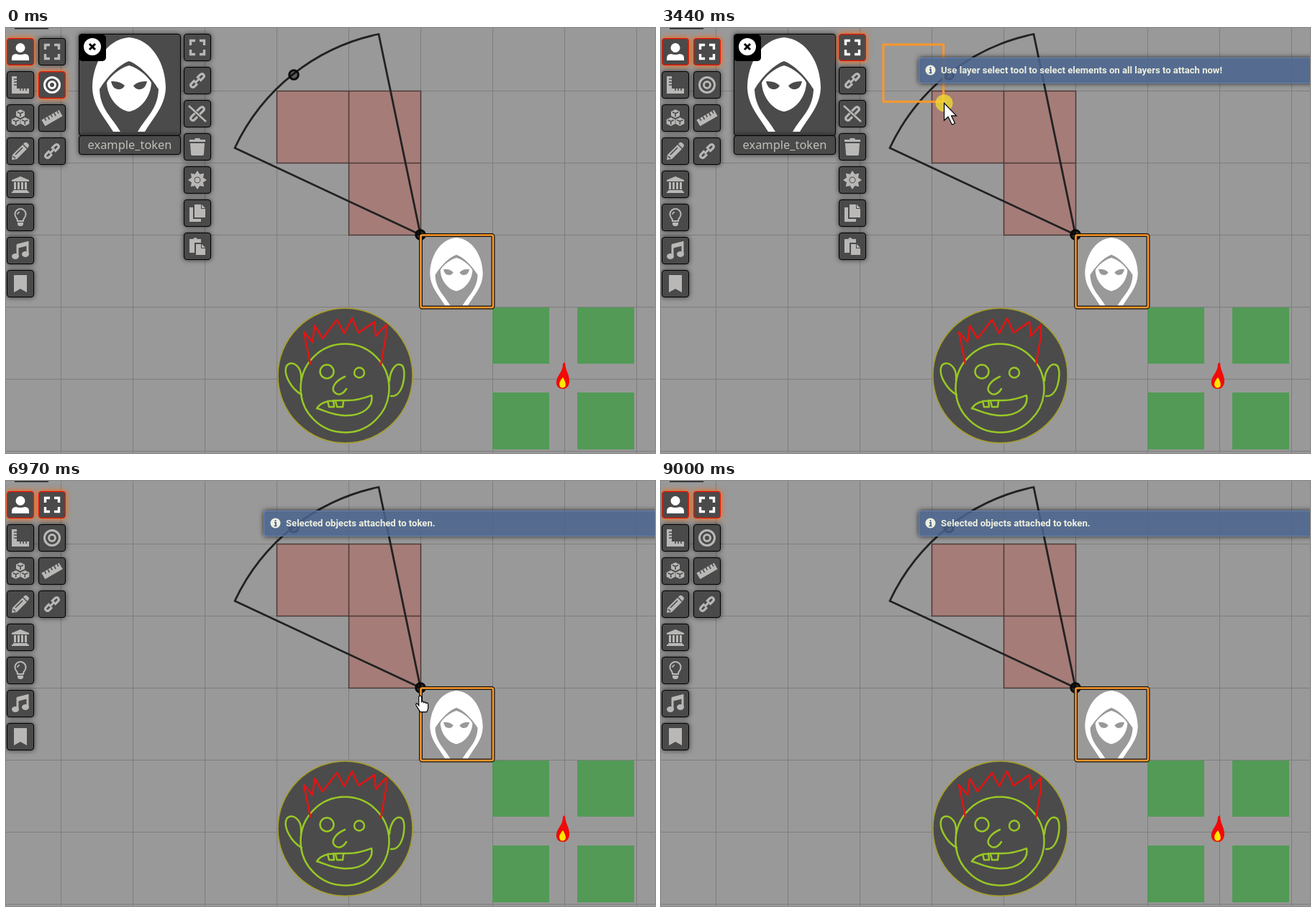
Recreate the animation shown at these times as an HTML page. Size 902 by 590 pixels, loop 9.32 s.

```html
<!DOCTYPE html>
<html lang="en">
<head>
<meta charset="utf-8">
<title>Attach elements to a token</title>
<style>
html, body { margin: 0; width: 100%; height: 100%; overflow: hidden; background: #999; }
#stage { position: relative; width: 902px; height: 590px; overflow: hidden; }
#stage > * { position: absolute; box-sizing: border-box; }
#scene, #pointer { left: 0; top: 0; }
#scene path, #scene circle { stroke-linejoin: round; stroke-linecap: round; }
.button { width: 38px; height: 38px; border: 1px solid #000; border-radius: 4px;
  background: #4a4a4a; box-shadow: 0 0 7px #000a; color: #b9b8b6; }
.button.on { border-color: #f21400; box-shadow: 0 0 9px #ff6400, inset 0 0 2px #f21400; color: #fff; }
.button svg { position: absolute; left: 6px; top: 6px; fill: currentColor; overflow: visible; }
.button .line { fill: none; stroke: currentColor; stroke-width: 3; }
.button .cut { fill: none; stroke: #4a4a4a; stroke-width: 1.6; }
#card { left: 101px; top: 8px; width: 142px; height: 168px; }
#card > * { position: absolute; box-sizing: border-box; left: 0; }
#card .face { width: 142px; height: 142px; border: 1px solid #000; border-radius: 4px;
  background: #4b4b4b; box-shadow: 0 0 7px #000a; }
#card .name { top: 141px; width: 142px; height: 27px; border: 1px solid #000; border-radius: 4px;
  background: #4a4a4a; box-shadow: 0 0 7px #000a; color: #c1bfb8; text-align: center;
  font: 16.4px/24px "Noto Sans", sans-serif; }
.toast { left: 358px; width: 560px; height: 36px; border: 1px solid #6583b1; border-radius: 4px;
  background: rgba(74, 101, 142, .86); box-shadow: 0 0 7px #000b; color: #f0f0e0;
  font: bold 13.1px/34px Roboto, sans-serif; padding-left: 30px; white-space: nowrap; }
.toast svg { position: absolute; left: 8px; top: 9px; }
</style>
</head>
<body>
<div id="stage">
  <svg id="scene" width="902" height="590" fill="none">
    <defs>
      <pattern id="grid" x="76" y="87" width="100" height="100" patternUnits="userSpaceOnUse">
        <path d="M.5 0V100M0 .5H100" stroke="#7d7d7d"/>
      </pattern>
      <path id="hood" fill-rule="evenodd" d="M0 0C-33 3-51 38-51 70C-50 95-36 108-22 131H-12C-24 110-40 100-41 72C-30 54-14 38 0 33C14 38 30 54 41 72C40 100 24 110 12 131H22C36 108 50 95 51 70C51 38 33 3 0 0Z
        M0 39C-14 43-27 55-31 63C-30 85-14 101 0 103C14 101 30 85 31 63C27 55 14 43 0 39Z
        M-25 61Q-13 60-6 67Q-9 73-16 72Q-23 71-25 61Z M25 61Q13 60 6 67Q9 73 16 72Q23 71 25 61Z"/>
      <g id="token">
        <use href="#hood" fill="#fff" transform="translate(626 291) scale(.72)"/>
        <rect x="576.5" y="287.5" width="100.5" height="100.5" rx="2" stroke="#111" stroke-width="5"/>
        <rect x="576.5" y="287.5" width="100.5" height="100.5" rx="2" stroke="#ff9829" stroke-width="2.6"/>
      </g>
    </defs>
    <rect width="902" height="590" fill="#999"/>
    <rect width="902" height="590" fill="url(#grid)"/>
    <g id="attached">
      <path d="M376.5 87.5h100v100h-100zM476.5 87.5h100v100h-100zM476.5 187.5h100v100h-100z"
        fill="#b0655e" fill-opacity=".55" stroke="#3a2a28" stroke-opacity=".8" stroke-width="1.5"/>
      <path d="M576 287L318 166.5A285 285 0 0 1 518 8.5Z" stroke="#222" stroke-width="2.8"/>
      <circle cx="400" cy="65" r="6.3" fill="#0006" stroke="#0a0a0a" stroke-width="3"/>
      <circle cx="576" cy="287" r="6.3" fill="#000a" stroke="#0a0a0a" stroke-width="3"/>
      <circle cx="471.5" cy="482.5" r="93.5" fill="#4b4b4b" stroke="#a59d28" stroke-width="1.5"/>
      <g stroke="#98c825" stroke-width="2.5">
        <circle cx="471" cy="500" r="61.5"/><circle cx="446" cy="477" r="9.5"/><circle cx="491" cy="478.5" r="7"/>
        <path d="M411 509C396 501 385 480 390 469C397 460 412 469 410 489M533 490C534 474 543 462 551 469C557 478 552 513 535 511
          M471 484C457 490 452 500 456 505C461 511 468 509 473 501
          M432 528C441 515 459 517 475 517C490 517 500 513 508 510C511 524 498 539 470 538C452 537 443 531 432 528Z
          M447 518L449 526H456L455 517M458 518L460 526H468L469 518"/>
      </g>
      <path stroke="#e21414" stroke-width="2.5" d="M423 466L414 422L426 436L429 413L440 431L460 405L470 424L481 403L490 423L512 408L514 428L528 412V428L521 467"/>
      <path fill="#529a56" d="M676 388h79v78h-79zM794 388h79v78h-79zM676 506h79v79h-79zM794 506h79v79h-79z"/>
      <path fill="#f00a08" d="M777 464C777 475 783 480 783 490C783 498 778 501 774 501C767 501 764 496 765 490C766 482 774 478 774 466Z"/>
      <path fill="#ffe600" d="M774 485C777 490 779 495 777 498Q773 501 770 498Q767 492 774 485Z"/>
    </g>
    <use id="placed" href="#token"/>
    <use id="dragged" href="#token" opacity=".8"/>
    <rect id="marquee" x="309" y="23" stroke="#ff9829" stroke-width="3"/>
    <rect x="12" width="47" height="1.5" fill="#222"/>
  </svg>
  <div id="card">
    <div class="face"></div>
    <svg width="142" height="142"><use href="#hood" fill="#fff" x="70" y="5"/>
      <rect y="1" width="38" height="37" rx="5"/><circle cx="19" cy="18" r="12" fill="#fff"/>
      <path d="M15 14l8 8m0-8l-8 8" stroke="#000" stroke-width="3"/></svg>
    <div class="name">example_token</div>
  </div>
  <svg id="pointer" width="902" height="590" style="z-index:2">
    <g id="cursor">
      <circle id="press" r="12" fill="#f4e32c" opacity=".72"/>
      <g fill="#fff" stroke="#000" stroke-width="1.2">
        <path id="arrow" d="M0 0V24L5.5 19L11 30L15 28L10 17.5H17Z"/>
        <path id="hand" d="M-2 1Q0-2 2 1V8Q4 6 5 9Q7 7 8 10Q10 8 11 11V16Q11 18 9 22H0Q-2 19-5 14Q-7 11-5 10Q-4 10-2 13Z"/>
      </g>
    </g>
  </svg>
</div>
<script>
const $ = id => document.getElementById(id);
const stage = $('stage');
const line = (d, w = 3) => `<path class="line" style="stroke-width:${w}" d="${d}"/>`;
const cut = d => `<path class="cut" d="${d}"/>`;
const fill = d => `<path d="${d}"/>`;
const turn = (angle, body) => `<g transform="rotate(${angle} 12 12)">${body}</g>`;
const cube = (x, y) => `<g transform="translate(${x} ${y})">` +
  fill('M0-6L6-3V3L0 6L-6 3V-3Z') + cut('M-4-2.3L0-.3L4-2.3M0 0V4') + '</g>';
const chain = line('M10 9H4Q0 9 0 12T4 15H9M14 9H20Q24 9 24 12T20 15H14', 3.2);

const icons = {
  user: '<circle cx="12" cy="6.5" r="6.5"/>' + fill('M0 24V21Q0 15 6 15Q12 17 18 15Q24 15 24 21V24Z'),
  expand: line('M2.5 9V2.5H9M15 2.5H21.5V9M21.5 15V21.5H15M9 21.5H2.5V15', 3.4),
  target: '<circle class="line" cx="12" cy="12" r="10.5"/><circle class="line" cx="12" cy="12" r="4.5"/>',
  square: fill('M0 0H7V17H24V24H0Z') + cut('M3 4H7M3 8H7M3 12H7M12 17V20M16 17V20M20 17V20'),
  cubes: cube(12, 6) + cube(5.7, 17) + cube(18.3, 17),
  ruler: turn(-30, fill('M-2 7H26V17H-2Z') + cut('M3 7V11M8 7V12M13 7V11M18 7V12M23 7V11')),
  pencil: fill('M0 24L1 17L15 3L21 9L7 23ZM16 2L18 0Q20-1 22 1L23 2Q25 4 23 6L22 8Z') + cut('M5 17L15 7M2 19L5 22'),
  link: turn(-45, chain + line('M7 12H17')),
  temple: fill('M12 1L24 6V8H0V6ZM2 20H22V22H24V24H0V22H2ZM3 9H6V19H3ZM8 9H11V19H8ZM13 9H16V19H13ZM18 9H21V19H18Z'),
  bulb: line('M8 17Q8 14 6 12A7.5 7.5 0 1 1 18 12Q16 14 16 17Z', 2) + fill('M8 19H16V22L14 24H10L8 22Z') + line('M8 8Q8 5 11 4.5', 1.5),
  music: line('M8 20V5L22 1V17', 3) + fill('M7 3L23-1V5L7 9Z') + '<ellipse cx="5" cy="20" rx="5" ry="4"/><ellipse cx="19" cy="17" rx="5" ry="4"/>',
  bookmark: fill('M3 0H21V24L12 19L3 24Z'),
  unlink: turn(-45, chain) + line('M0 1L24 23', 2.6),
  trash: fill('M1 2H8L9 0H15L16 2H23V5H1ZM2 7H22L21 22Q21 24 19 24H5Q3 24 3 22Z'),
  sun: [0, 45, 90, 135].map(a => turn(a, fill('M8 5L12-1L16 5ZM8 19L12 25L16 19Z'))).join('') +
    '<circle class="line" cx="12" cy="12" r="6"/><circle cx="12" cy="12" r="3.5"/>',
  copy: fill('M8 0H17V6H23V18H8ZM18 0L23 5H18ZM1 4H6V20H17V24H1Z'),
  paste: fill('M1 2H6Q9-2 12 2H17V7H8V21H1ZM10 9H17V15H23V24H10ZM18 9L23 14H18Z')
};

const buttons = {};
function column(x, y, names) {
  names.split(' ').forEach((name, i) => {
    const el = document.createElement('div');
    el.className = 'button';
    el.style.cssText = `left:${x}px;top:${y + 46 * i}px`;
    el.innerHTML = `<svg width="24" height="24">${icons[name]}</svg>`;
    stage.append(el);
    buttons[x + name] = el;
  });
}
column(1, 14, 'user square cubes pencil temple bulb music bookmark');
column(45, 14, 'expand target ruler link');
column(247, 8, 'expand link unlink trash sun copy paste');
const panel = Object.keys(buttons).filter(k => k.startsWith('247')).map(k => buttons[k]);
buttons['1user'].classList.add('on');

function toast(text) {
  const el = document.createElement('div');
  el.className = 'toast';
  el.innerHTML = '<svg width="15" height="15"><circle cx="7.5" cy="7.5" r="7" fill="#f0f0e0"/>' +
    '<path d="M7.5 3v2.2M6 7h2v4M5.5 11.3h4" stroke="#4a658e" stroke-width="1.8" fill="none"/></svg>' + text;
  stage.append(el);
  return el;
}
const hint = toast('Use layer select tool to select elements on all layers to attach now!');
const done = toast('Selected objects attached to token.');

// Pointer path: time, x, y
const path = [
  [220, 890, 526], [600, 560, 250], [1000, 266, 26], [1330, 266, 26], [1780, 82, 38], [1860, 76, 35.5],
  [2030, 72, 36], [2340, 72, 36], [2700, 190, 70], [3050, 352, 55], [3270, 311, 24], [3350, 309, 23],
  [3910, 881, 573], [5100, 881, 573], [5700, 568.5, 321.5], [6110, 139, 55], [6190, 121, 28],
  [6270, 121, 28], [6970, 583, 303], [7130, 638, 328], [7210, 650, 328], [7520, 738, 328],
  [7840, 738, 328], [8070, 638, 331], [8230, 634, 331], [8840, 844, 575], [8930, 850, 588]
];
function pointerAt(t) {
  const i = path.findIndex(p => p[0] > t);
  if (i < 0) return path[path.length - 1].slice(1);
  if (!i) return path[0].slice(1);
  const [a, ax, ay] = path[i - 1], [b, bx, by] = path[i];
  const k = (t - a) / (b - a);
  return [ax + (bx - ax) * k, ay + (by - ay) * k];
}

const LOOP = 9320, STEP = 78.36;
const show = (el, yes) => { el.style.visibility = yes ? 'visible' : 'hidden'; };

function draw(now) {
  const t = 220 + STEP * Math.floor((now - 213) / STEP);
  const during = (...spans) => spans.some(([a, b]) => t > a - 30 && t < b - 30);
  const [x, y] = pointerAt(t);

  const hand = during([1000, 1480], [1780, 2420], [6190, 6350], [6970, 7210], [7750, 7920]);
  $('cursor').setAttribute('transform', `translate(${x} ${y})`);
  show($('cursor'), during([220, 9000]));
  show($('arrow'), !hand && during([220, 9000]));
  show($('hand'), hand);
  show($('press'), during([1000, 1080], [2190, 2260], [3350, 4540], [6190, 6270], [7130, 7520], [7920, 8230]));

  buttons['247expand'].classList.toggle('on', during([1000, 4700]));
  buttons['45expand'].classList.toggle('on', during([1780, LOOP + 99]));
  buttons['45target'].classList.toggle('on', t < 2230);
  const open = t < 6240;
  [$('card'), ...panel].forEach(el => show(el, open));

  hint.style.top = t < 4670 ? '41px' : '83px';
  hint.style.opacity = during([1160, 1240], [6270, 6350]) ? .5 : +during([1240, 6270]);
  done.style.top = '41px';
  done.style.opacity = during([4700, 4770]) ? .4 : during([4770, 4850]) ? .8 : +(t > 4820);

  const selecting = during([3440, 4540]);
  show($('marquee'), selecting);
  $('marquee').setAttribute('width', Math.max(0, x - 310));
  $('marquee').setAttribute('height', Math.max(0, y - 25));

  const home = during([7520, 8230]) ? 100 : 0;
  const dragging = during([7210, 7520], [7920, 8230]);
  $('attached').setAttribute('transform', `translate(${home})`);
  $('placed').setAttribute('x', home);
  $('placed').setAttribute('opacity', dragging ? .4 : 1);
  $('dragged').setAttribute('x', pointerAt(t - 18)[0] - 638);
  show($('dragged'), dragging);
}

let start;
function frame(now) {
  start ??= now;
  draw((now - start) % LOOP);
  requestAnimationFrame(frame);
}
draw(0);
requestAnimationFrame(frame);
</script>
</body>
</html>
```
